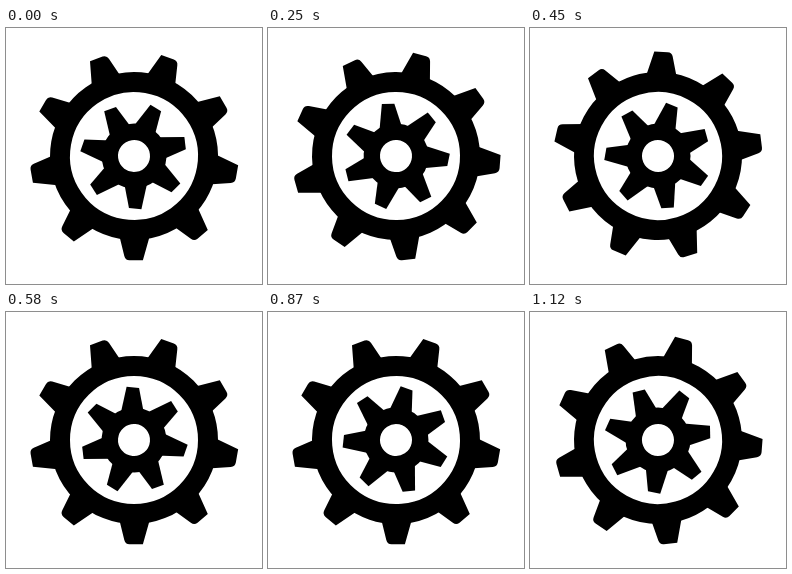
These frames come from a looping animation (256 px wide and 256 px high, 1.16 s). An HTML page:

```html
<!DOCTYPE html>
<html lang="en">
<head>
<meta charset="utf-8">
<title>Gears</title>
<style>
  html, body { margin: 0; height: 100%; overflow: hidden; background: #fff; }
  svg { display: block; width: 100%; height: 100%; }
</style>
</head>
<body>
<svg viewBox="-128 -128 256 256">
  <g id="outer">
    <circle r="74" fill="none" stroke="#000" stroke-width="20"/>
  </g>
  <g id="inner">
    <circle r="24.2" fill="none" stroke="#000" stroke-width="16.4"/>
  </g>
</svg>
<script>
const LOOP = 1160, OUTER_TEETH = 9, INNER_TEETH = 7;
const outer = document.getElementById('outer');
const inner = document.getElementById('inner');

function addTeeth(gear, count, d) {
  for (let i = 0; i < count; i++) {
    const tooth = document.createElementNS('http://www.w3.org/2000/svg', 'path');
    tooth.setAttribute('d', d);
    tooth.setAttribute('transform', `rotate(${i * 360 / count})`);
    gear.append(tooth);
  }
}

// Outer teeth have one sharp and one rounded corner; inner teeth lean a little.
addTeeth(outer, OUTER_TEETH, 'M78-16.3L104.2-8.9V4.5Q104.2 8.7 100 9.7L78 15.1Z');
addTeeth(inner, INNER_TEETH, 'M25-13.2L53.5-6.3L51.9 6.1L25 10.7Z');

const turn = (gear, angle) => gear.setAttribute('transform', `rotate(${angle})`);

function draw(now) {
  // 24 steps a second, each starting on a whole 10 ms tick
  const tick = Math.floor((now % LOOP) / 10);
  const step = Math.ceil((tick + 1) * 6 / 25) - 1;
  // per loop: four outer teeth clockwise, three inner teeth back
  turn(outer, 10 + step / 28 * 4 * 360 / OUTER_TEETH);
  turn(inner, 37.4 - step / 28 * 3 * 360 / INNER_TEETH);
  requestAnimationFrame(draw);
}
draw(0);
</script>
</body>
</html>
```
